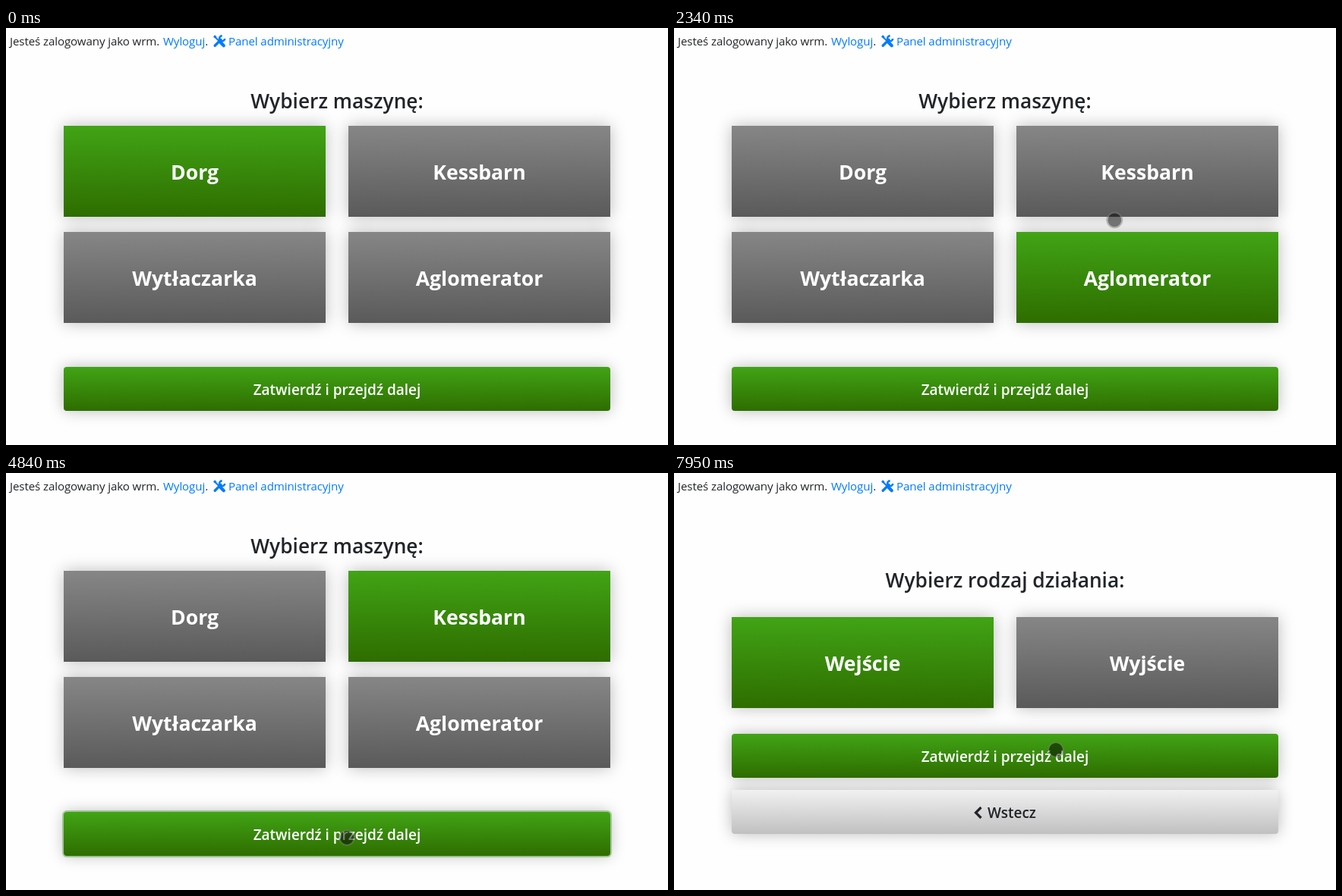
Write an HTML page that moves like this. It is 872x550 px and loops after 8 s.

```html
<!DOCTYPE html>
<html lang="pl">
<head>
<meta charset="utf-8">
<title>Panel</title>
<style>
html, body { margin: 0; width: 100%; height: 100%; overflow: hidden; background: #fefefe; }
#stage { position: relative; width: 872px; height: 550px; overflow: hidden; --shadow: 0 0 20px rgba(0,0,0,.27); }
.page, svg { position: absolute; left: 0; top: 0; width: 872px; height: 550px; }
.box { position: absolute; box-shadow: var(--shadow); background: linear-gradient(#868686, #5a5a5a); }
.card { width: 345px; height: 120px; }
.bar { left: 76px; width: 720px; height: 58px; border-radius: 4px; }
.on { background: linear-gradient(#41a415, #2e6d00); }
.back { background: linear-gradient(#f1f1f1, #c0c0c0); }
text { font-family: "Open Sans", "Noto Sans", sans-serif; fill: #212529; }
.mid { text-anchor: middle; }
.line { font-size: 15.1px; letter-spacing: -.1px; }
.title { font-size: 26.3px; font-weight: 600; }
.name { font-size: 26.6px; font-weight: 700; fill: #fff; }
.label { font-size: 19px; font-weight: 600; fill: #fff; }
.link { fill: #007bff; }
.dark { fill: #212529; }
#cursor { position: absolute; left: -11px; top: -11px; width: 18px; height: 18px; border: 2px solid rgba(120,120,110,.45);
  border-radius: 50%; background: rgba(0,0,0,.5); background-clip: padding-box; }
</style>
</head>
<body>
<div id="stage">
  <div class="page" id="machines">
    <div class="box card" style="left:76px;top:129px"></div>
    <div class="box card" style="left:451px;top:129px"></div>
    <div class="box card" style="left:76px;top:269px"></div>
    <div class="box card" style="left:451px;top:269px"></div>
    <div class="box bar on" id="submit" style="top:447px"></div>
    <svg>
      <text class="title mid" x="436" y="106">Wybierz maszynę:</text>
      <text class="name mid" x="248.5" y="200">Dorg</text>
      <text class="name mid" x="623.5" y="200">Kessbarn</text>
      <text class="name mid" x="248.5" y="340">Wytłaczarka</text>
      <text class="name mid" x="623.5" y="340">Aglomerator</text>
      <text class="label mid" x="436" y="484">Zatwierdź i przejdź dalej</text>
    </svg>
  </div>
  <div class="page" id="actions">
    <div class="box card on" style="left:76px;top:190px"></div>
    <div class="box card" style="left:451px;top:190px"></div>
    <div class="box bar on" style="top:344px"></div>
    <div class="box bar back" style="top:418px"></div>
    <svg>
      <text class="title mid" x="436" y="151">Wybierz rodzaj działania:</text>
      <text class="name mid" x="248.5" y="261">Wejście</text>
      <text class="name mid" x="623.5" y="261">Wyjście</text>
      <text class="label mid" x="436" y="381">Zatwierdź i przejdź dalej</text>
      <path d="M404.5 441l-7 7 7 7" fill="none" stroke="#212529" stroke-width="3.2"/>
      <text class="label dark" x="413" y="455">Wstecz</text>
    </svg>
  </div>
  <svg>
    <text class="line" x="5" y="23">Jesteś zalogowany jako wrm.</text>
    <text class="line" x="207" y="23"><tspan class="link">Wyloguj</tspan>.</text>
    <g transform="translate(273 9.5)" fill="none" stroke="#007bff">
      <path d="M2.2 13.8L10 6" stroke-width="3.4" stroke-linecap="round"/>
      <path d="M11.6.9A3.5 3.5 0 1 0 15.1 4.4" stroke-width="2.6"/>
      <path d="M1.2 1.2L8 8" stroke-width="2"/>
      <path d="M1 1l2.6 2" stroke-width="3"/>
      <path d="M9.8 9.8l4 4" stroke-width="4.2" stroke-linecap="round"/>
    </g>
    <text class="line link" x="293" y="23">Panel administracyjny</text>
  </svg>
  <div id="cursor"></div>
</div>
<script>
const LOOP = 8000;
// start, end, then start point, control point and end point
const moves = [
  [210, 790, 786, 553, 700, 508, 660, 489],
  [1350, 1790, 660, 489, 626, 438, 574, 356],
  [2020, 2440, 574, 356, 582, 298, 580, 240],
  [2710, 3190, 580, 240, 520, 242, 392, 306],
  [3990, 4350, 392, 306, 420, 400, 449, 505],
  [4470, 4600, 449, 505, 449, 493, 449, 481],
  [6120, 6510, 449, 481, 459, 420, 444, 363],
  [7050, 7400, 444, 363, 480, 325, 533, 309],
  [7620, 7950, 533, 309, 513, 330, 503, 365]
];
// time, selected card
const picks = [[0, 0], [1930, 3], [2590, 1]];
const PAGE_AT = 5350, FOCUS_AT = 4750, FOCUS_MS = 90;

const $ = id => document.getElementById(id);
const cards = document.querySelectorAll("#machines .card");
const clamp = v => Math.max(0, Math.min(1, v));
const last = (list, t) => list.filter(m => m[0] <= t).pop();
const ease = p => 1 - Math.pow(1 - p, 1.5);
const curve = (a, b, c, p) => (1 - p) * (1 - p) * a + 2 * p * (1 - p) * b + p * p * c;

function draw(t) {
  const second = t >= PAGE_AT;
  $("machines").style.display = second ? "none" : "block";
  $("actions").style.display = second ? "block" : "none";

  const picked = last(picks, t)[1];
  cards.forEach((card, i) => card.classList.toggle("on", i === picked));

  const ring = clamp((t - FOCUS_AT) / FOCUS_MS);
  $("submit").style.boxShadow = `0 0 0 2px rgba(64,150,40,${0.4 * ring}), var(--shadow)`;

  const move = last(moves, t);
  $("cursor").style.display = move ? "block" : "none";
  if (move) {
    const [t0, t1, x0, y0, cx, cy, x1, y1] = move;
    const p = ease(clamp((t - t0) / (t1 - t0)));
    $("cursor").style.transform = `translate(${curve(x0, cx, x1, p)}px, ${curve(y0, cy, y1, p)}px)`;
  }
}

const start = performance.now();
function tick() {
  draw((performance.now() - start) % LOOP);
  requestAnimationFrame(tick);
}
draw(0);
requestAnimationFrame(tick);
</script>
</body>
</html>
```
